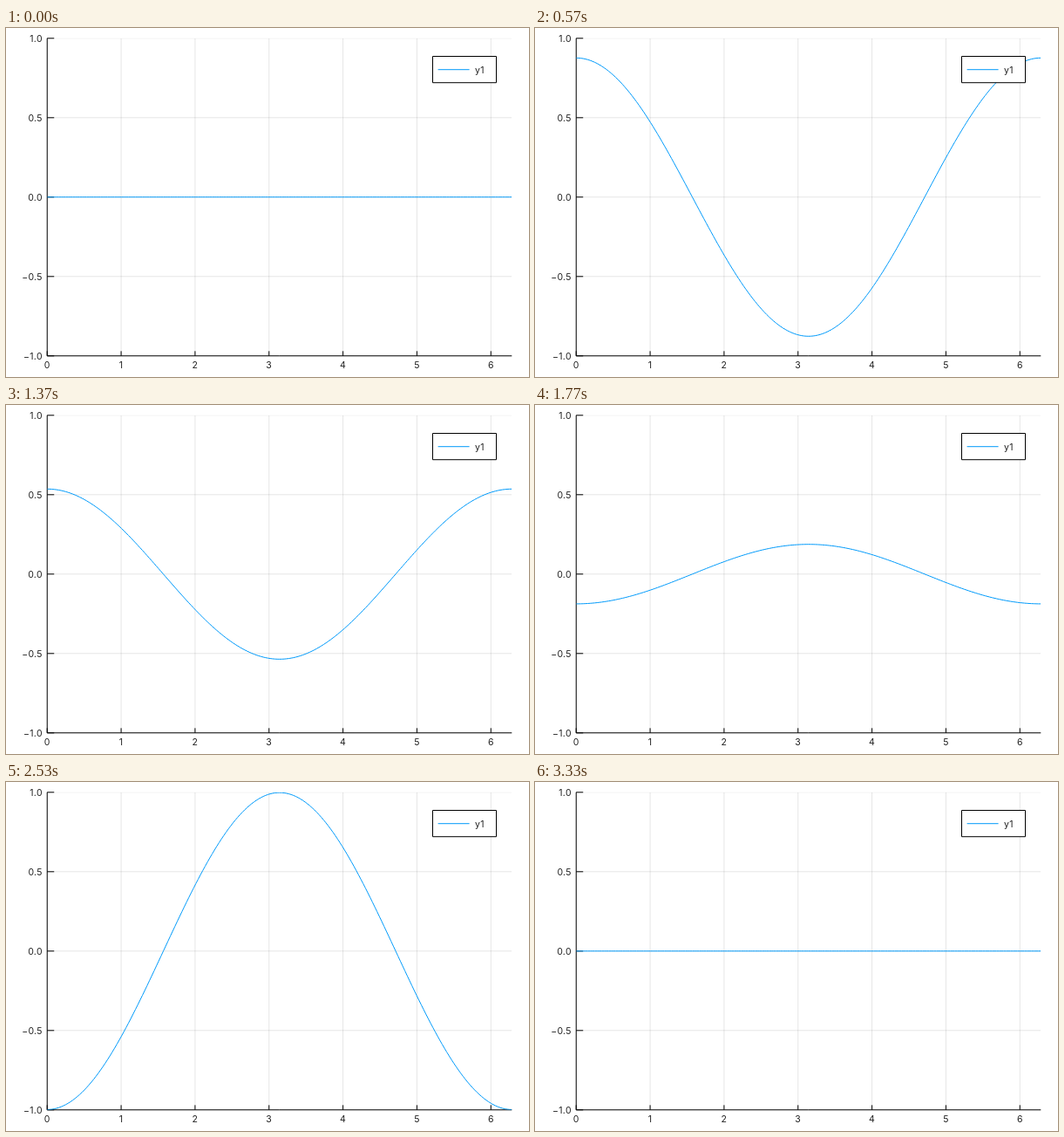
An HTML page with a canvas for the animation above (3.36 s loop, 600x400 px).

```html
<!DOCTYPE html>
<html lang="en">
<head>
<meta charset="utf-8">
<title>Standing wave</title>
<style>
  html, body { margin: 0; width: 100%; height: 100%; overflow: hidden; background: #fff; }
  canvas { display: block; }
</style>
</head>
<body>
<canvas id="stage" width="600" height="400"></canvas>
<script>
const ctx = document.getElementById('stage').getContext('2d');
const LOOP = 3360, STEPS = 100, TAU = 2 * Math.PI;
const BLUE = '#009afa', GRID = 'rgba(0,0,0,0.1)', INK = '#222';
const plot = { left: 47.24, top: 11.81, right: 580.31, bottom: 375.8 };
const width = plot.right - plot.left, height = plot.bottom - plot.top;
const xTicks = [0, 1, 2, 3, 4, 5, 6];
const yTicks = [-1, -0.5, 0, 0.5, 1];

const px = x => plot.left + x / TAU * width;
const py = y => plot.top + (1 - y) / 2 * height;

function line(x1, y1, x2, y2, color) {
  ctx.strokeStyle = color;
  ctx.beginPath();
  ctx.moveTo(x1, y1);
  ctx.lineTo(x2, y2);
  ctx.stroke();
}

function label(text, x, y, align) {
  ctx.fillStyle = INK;
  ctx.textAlign = align;
  ctx.fillText(text, x, y);
}

function clipped(draw) {
  ctx.save();
  ctx.beginPath();
  ctx.rect(plot.left, plot.top, width, height);
  ctx.clip();
  draw();
  ctx.restore();
}

function drawGrid() {
  for (const x of xTicks) line(px(x), plot.top, px(x), plot.bottom, GRID);
  for (const y of yTicks) line(plot.left, py(y), plot.right, py(y), GRID);
}

function drawAxes() {
  line(plot.left, plot.bottom, plot.right, plot.bottom, '#000');
  line(plot.left, plot.top, plot.left, plot.bottom, '#000');
  for (const x of xTicks) {
    line(px(x), plot.bottom, px(x), plot.bottom - 0.015 * height, '#000');
    label(String(x), px(x), 390.4, 'center');
  }
  for (const y of yTicks) {
    line(plot.left, py(y), plot.left + 0.015 * width, py(y), '#000');
    label(y.toFixed(1).replace('-', '\u2212'), 41.8, py(y) + 4, 'right');
  }
}

function drawWave(amplitude) {
  ctx.strokeStyle = BLUE;
  ctx.beginPath();
  for (let i = 0; i <= 200; i++) {
    const x = TAU * i / 200;
    ctx.lineTo(px(x), py(amplitude * Math.cos(x)));
  }
  ctx.stroke();
}

function drawLegend() {
  ctx.fillStyle = '#fff';
  ctx.fillRect(489.5, 32.5, 73, 30.2);
  ctx.strokeStyle = '#000';
  ctx.strokeRect(489.5, 32.5, 73, 30.2);
  line(495.6, 47.7, 531.6, 47.7, BLUE);
  label('y1', 538, 51.6, 'left');
}

function render(time) {
  // 30 steps per second, with step times rounded to 10 ms
  const step = Math.floor((Math.floor(time / 10) + 0.5) * 0.3);
  ctx.fillStyle = '#fff';
  ctx.fillRect(0, 0, 600, 400);
  ctx.lineWidth = 1;
  ctx.lineJoin = 'round';
  ctx.font = '10.5px Inter, sans-serif';
  ctx.letterSpacing = '0.3px';
  clipped(drawGrid);
  drawAxes();
  clipped(() => drawWave(Math.sin(TAU * step / STEPS)));
  drawLegend();
}

const start = performance.now();
function tick() {
  render((performance.now() - start) % LOOP);
  requestAnimationFrame(tick);
}
tick();
</script>
</body>
</html>
```
